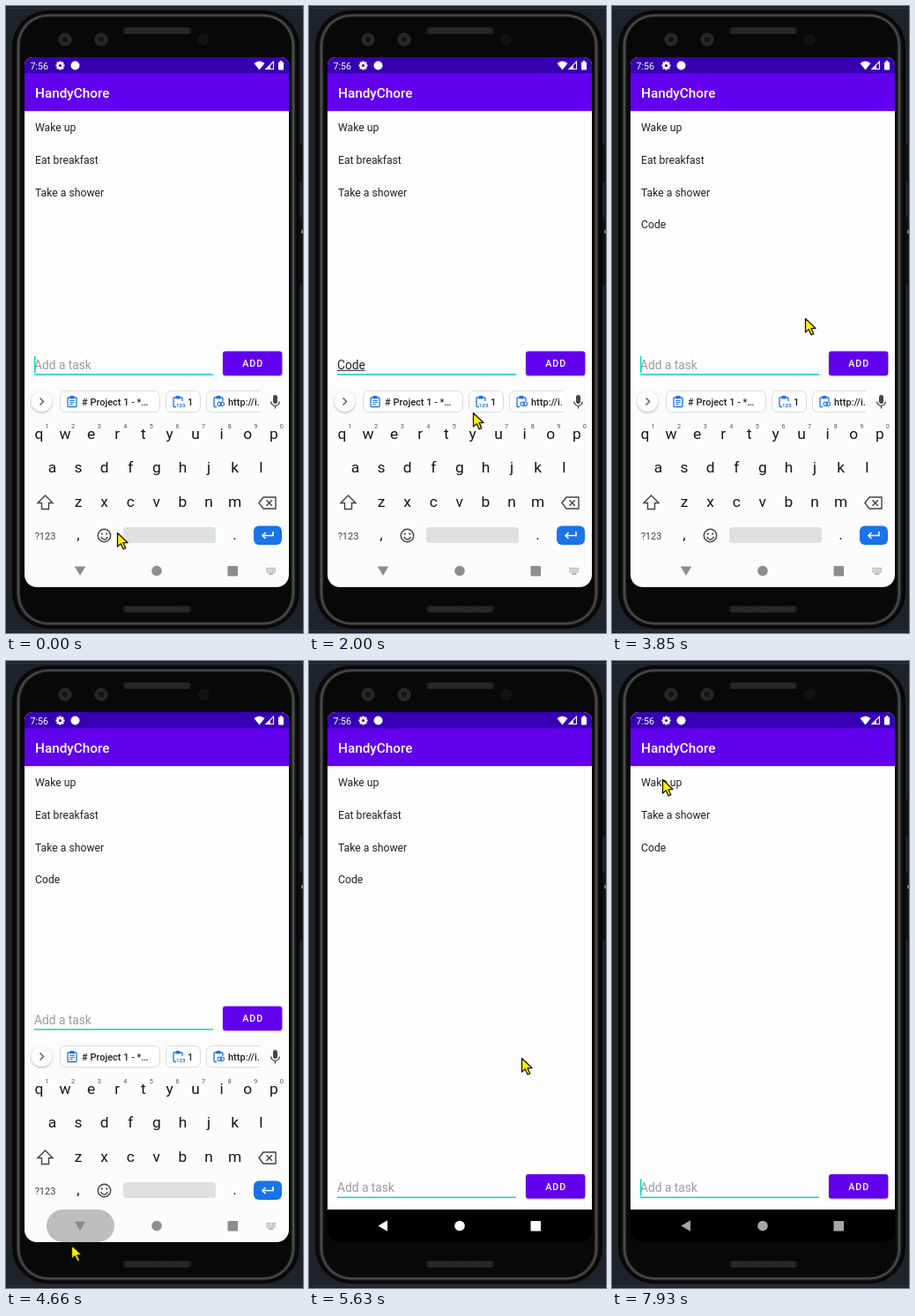
Animation, 337 px wide and 711 px high, one loop 8000 ms. Source, as an HTML page with a canvas:

```html
<!DOCTYPE html>
<html lang="en">
<head>
<meta charset="utf-8">
<title>To-do list demo</title>
<style>
  html, body { margin: 0; width: 100%; height: 100%; overflow: hidden; background: #1f2229; }
  canvas { display: block; width: 337px; height: 711px; }
</style>
</head>
<body>
<canvas id="stage"></canvas>
<script>
const W = 337, H = 711, LOOP = 8000;
const dpr = window.devicePixelRatio || 1;
const stage = document.getElementById('stage');
const keyboard = document.createElement('canvas');
for (const c of [stage, keyboard]) {
  c.width = W * dpr;
  c.height = H * dpr;
  c.getContext('2d').scale(dpr, dpr);
}
let g = keyboard.getContext('2d');

const FIRST_KEY = 440, KEY_GAP = 145, ADDED = 3040;
const HIDING = 4700, HIDDEN = 4900, REMOVED = 6780;
const POINTER_STEP = 140, BLINK = 595;

// Turning points of the pointer: time, x, y.
const PATH = [
  [1400, 126, 597], [1820, 136, 580], [1960, 186, 461], [2240, 268, 372], [2520, 276, 403],
  [3200, 276, 403], [3780, 219, 354], [4200, 102, 372], [4620, 74, 662], [4760, 73, 643],
  [5320, 233, 417], [5600, 241, 450], [6300, 75, 177], [7280, 75, 177], [7840, 57, 134]
];

const clamp = (v, lo = 0, hi = 1) => Math.min(hi, Math.max(lo, v));
const progress = (t, from, to) => clamp((t - from) / (to - from));
const ease = p => p * p * (3 - 2 * p);
const mix = (a, b, p) => a + (b - a) * p;
const gray = v => `rgb(${v}, ${v}, ${v})`;

function box(x, y, w, h, r, fill, stroke, lw = 1) {
  g.beginPath();
  g.roundRect(x, y, w, h, r);
  if (fill) { g.fillStyle = fill; g.fill(); }
  if (stroke) { g.strokeStyle = stroke; g.lineWidth = lw; g.stroke(); }
}
function disc(x, y, r, fill, stroke, lw = 1) {
  box(x - r, y - r, 2 * r, 2 * r, r, fill, stroke, lw);
}
function rect(x, y, w, h, fill) {
  g.fillStyle = fill;
  g.fillRect(x, y, w, h);
}
function poly(points, fill, stroke, lw = 1, closed = true) {
  g.beginPath();
  points.forEach(([x, y]) => g.lineTo(x, y));
  if (closed) g.closePath();
  if (fill) { g.fillStyle = fill; g.fill(); }
  if (stroke) { g.strokeStyle = stroke; g.lineWidth = lw; g.stroke(); }
}
function text(s, x, y, size, color, { weight = 400, space = 0, align = 'left' } = {}) {
  g.font = `${weight} ${size}px Roboto, sans-serif`;
  g.letterSpacing = space + 'px';
  g.textAlign = align;
  g.fillStyle = color;
  g.fillText(s, x, y);
  return g.measureText(s).width;
}
function scoped(draw) {
  g.save();
  draw();
  g.restore();
}
function shadowed(blur, alpha, draw) {
  scoped(() => {
    g.shadowColor = `rgba(0, 0, 0, ${alpha})`;
    g.shadowBlur = blur * dpr;
    g.shadowOffsetY = dpr;
    draw();
  });
}

function drawGrille(y) {
  box(133, y, 77, 8, 4, '#1e1e1e');
  for (let row = 0; row < 3; row++)
    for (let x = 136 + row % 2; x < 207; x += 2) rect(x, y + 1.5 + row * 2, 1, 1, '#424242');
}

function drawPhone() {
  rect(0, 0, W, H, '#1f2229');
  rect(0, 2, W, 1, '#30343c');
  rect(0, 708, W, 1, '#30343c');
  box(331, 157, 5, 43, 2, '#111');
  box(331, 239, 5, 78, 2, '#111');
  rect(335, 254, 2, 4, '#777');
  // The metal rim brightens towards its middle.
  for (let i = 0; i < 12; i++) {
    const shade = 8 + 72 * Math.exp(-(((i - 6.5) / 1.8) ** 2));
    box(7 + i, 5 + i * .8, 326 - 2 * i, 701 - 1.6 * i, 41 - i, gray(shade));
  }
  drawGrille(24);
  drawGrille(680);
  for (const x of [67, 108]) {
    disc(x, 38, 7, '#222224', '#343436');
    disc(x, 38, 4.2, '#151517', '#424244', .8);
  }
  disc(224, 38, 5.5, '#111113', '#1b1b1d');
}

function drawStatusBar() {
  const blue = '#3700b3';
  rect(21, 58, 300, 19, blue);
  text('7:56', 27.5, 71.5, 10.7, '#fff');
  scoped(() => {
    g.translate(61.5, 67.5);
    for (let i = 0; i < 4; i++) {
      g.rotate(Math.PI / 4);
      rect(-1.2, -5, 2.4, 10, '#fff');
    }
    disc(0, 0, 3.8, '#fff');
    disc(0, 0, 1.6, blue);
  });
  disc(78.5, 67.5, 5, '#fff');
  g.beginPath();
  g.moveTo(287.5, 72.5);
  g.lineTo(281.5, 65);
  g.quadraticCurveTo(287.5, 60, 293.5, 65);
  g.fill();
  poly([[295, 71.5], [303.5, 71.5], [303.5, 63]], null, '#fff', 1.1);
  poly([[295, 72], [300, 72], [300, 67]], '#fff');
  box(309, 63.5, 6, 9, 1, '#fff');
  rect(310.7, 62, 2.6, 2, '#fff');
}

function caretOn(t, typedCount) {
  const lastKey = FIRST_KEY + (typedCount - 1) * KEY_GAP;
  const base = t < FIRST_KEY ? 130 - BLINK : t < ADDED ? lastKey : 2652;
  return Math.floor((t - base) / BLINK) % 2 === 0;
}

function drawEntry(t) {
  const count = clamp(Math.floor((t - FIRST_KEY) / KEY_GAP) + 1, 0, 4);
  const typed = t < ADDED ? 'Code'.slice(0, count) : '';
  const teal = '#03dac5';
  let end = 32;
  if (typed) {
    const width = text(typed, 32, 411.7, 13.75, '#212121');
    rect(32, 412.8, width, 1, '#212121');
    end += width;
  } else {
    text('Add a task', 32, 411.7, 13.75, '#9b9b9b');
  }
  rect(32, 417, 203, 1.5, teal);
  if (caretOn(t, count)) rect(end, 397, 1.5, 19, teal);
  shadowed(2, .3, () => box(246, 391.6, 67.3, 27.5, 3, '#6200ee'));
  text('ADD', 280.2, 409.3, 10.7, '#fff', { weight: 500, space: .95, align: 'center' });
}

function drawApp(t) {
  rect(21, 58, 300, 564, '#fdfdfd');
  rect(21, 622, 300, 37, '#000');
  drawStatusBar();
  rect(21, 76.3, 300, 42.9, '#6200ee');
  text('HandyChore', 33, 104, 15.3, '#fff', { weight: 500 });

  const items = ['Wake up', 'Eat breakfast', 'Take a shower'];
  if (t >= ADDED) items.push('Code');
  if (t >= REMOVED) items.splice(1, 1);
  items.forEach((s, i) => text(s, 33, 142.4 + 36.66 * i, 12.2, '#212121'));

  scoped(() => {
    g.translate(0, t < HIDING ? 0 : 190.5);
    drawEntry(t);
  });
}

function drawClipboard(x, kind) {
  const blue = '#1a73e8';
  box(x - 5, 444, 10, 10.5, 1, null, blue, 1.3);
  box(x - 2.5, 442, 5, 3.5, 1, blue);
  if (kind === 'lines') {
    for (let i = 0; i < 3; i++) rect(x - 2.8, 447 + i * 2, i < 2 ? 5.6 : 3.6, 1, blue);
    return;
  }
  rect(x - 2, 448, 9, 8, '#fff');
  if (kind === 'digits') text('123', x - 2, 454.5, 6, blue, { weight: 700 });
  else for (const dx of [-1, 2]) box(x + dx, 449, 4.5, 4.5, 2.2, null, blue, 1.1);
}

function drawChip(x, w, kind, label) {
  box(x + .5, 436.5, w, 24, 6, '#fff', '#d9dbdf');
  drawClipboard(x + 14, kind);
  text(label, x + 25, 453, 11, '#202124', { weight: 500 });
}

function drawSuggestions() {
  const ink = '#44474b';
  shadowed(2.5, .3, () => disc(40.5, 448.5, 11.8, '#fff'));
  poly([[38.5, 444.5], [42.5, 448.5], [38.5, 452.5]], null, '#5f6368', 1.5, false);
  drawChip(61, 113, 'lines', '# Project 1 - *…');
  drawChip(181, 39, 'digits', '1');
  scoped(() => {
    g.beginPath();
    g.rect(226, 434, 62, 30);
    g.clip();
    drawChip(227, 80, 'link', 'http://i.');
  });
  box(303, 441, 5, 10, 2.5, ink);
  g.strokeStyle = ink;
  g.lineWidth = 1.3;
  g.beginPath();
  g.arc(305.5, 448.5, 4.8, 0, Math.PI);
  g.moveTo(305.5, 453);
  g.lineTo(305.5, 456.5);
  g.stroke();
}

function drawKeys() {
  const ink = '#151618', soft = '#3f4246', mid = { align: 'center' };
  const row = (keys, x, y, size = 17.4, color = ink) =>
    [...keys].forEach((k, i) => text(k, x + 29.6 * i, y, size, color, mid));
  row('qwertyuiop', 37.5, 491);
  row('1234567890', 46.5, 478.5, 7.3, '#505458');
  row('asdfghjkl', 52.5, 529);
  row('zxcvbnm', 82, 568);

  poly([[44.5, 555], [53, 563.5], [48.5, 563.5], [48.5, 570.5], [40.5, 570.5],
        [40.5, 563.5], [36, 563.5]], null, soft, 1.4);
  poly([[287, 563.5], [292, 557], [306, 557], [306, 570], [292, 570]], null, soft, 1.4);
  for (const s of [-1, 1])
    poly([[298.7 - 3.2 * s, 560.3], [298.7 + 3.2 * s, 566.7]], null, soft, 1.4, false);

  text('?123', 44.5, 604.5, 11, soft, mid);
  text(',', 82, 605, 17, ink, mid);
  text('.', 259.5, 605, 17, ink, mid);
  for (const dx of [-2.7, 2.7]) disc(111.5 + dx, 598.6, 1.1, soft);
  disc(111.5, 600.5, 7.2, null, soft, 1.4);
  g.beginPath();
  g.arc(111.5, 601.2, 3.8, .2, Math.PI - .2);
  g.stroke();
  box(133, 591, 105, 18, 3.5, '#dfe1e1');
  box(281, 589.5, 32, 21.5, 6, '#1a73e8');
  poly([[303, 596], [303, 600.5], [291, 600.5]], null, '#fff', 1.6, false);
  poly([[294.5, 597], [291, 600.5], [294.5, 604]], null, '#fff', 1.6, false);
}

function drawNav(t) {
  const open = t < HIDING;
  const ripple = t < 4620 ? 0 : .4 * (1 - progress(t, 4780, 5220));
  if (ripple) box(46, 622, 77, 37, 18.5, `rgba(95, 95, 95, ${ripple})`);
  const color = gray(open ? 141 : mix(255, 166, progress(t, 7000, 7500)));
  scoped(() => {
    g.translate(84, 640.5);
    g.rotate(Math.PI / 2 * clamp(Math.ceil((t - HIDING) / 30) / 3.6));
    poly([[-6.3, -5], [6.3, -5], [0, 5.6]], color);
  });
  disc(171, 640.5, 5.8, color);
  box(251.5, 635, 11.5, 11.5, .8, color);
  if (!open) return;
  for (let i = 0; i < 15; i++)
    rect(295.5 + i % 5 * 2.2, 637 + Math.floor(i / 5) * 2.1, 1.4, 1.3, color);
  rect(298, 643.4, 5.5, 1.2, color);
}

function pointerAt(t) {
  const now = Math.floor(t / POINTER_STEP) * POINTER_STEP;
  const next = PATH.findIndex(([k]) => k > now);
  if (next === 0) return PATH[0].slice(1);
  if (next < 0) return PATH.at(-1).slice(1);
  const [t0, x0, y0] = PATH[next - 1], [t1, x1, y1] = PATH[next];
  const p = ease(progress(now, t0, t1));
  return [mix(x0, x1, p), mix(y0, y1, p)];
}

function drawPointer(t) {
  scoped(() => {
    const [x, y] = pointerAt(t);
    g.translate(x + .5, y + .5);
    g.lineJoin = 'round';
    poly([[0, 0], [0, 15.5], [3.7, 12.2], [6.6, 18.4], [9.3, 17.2], [6.5, 11.2], [11.5, 11]],
      '#fff200', '#1c1a00', 1.3);
  });
}

function drawKeyboard(t) {
  if (t >= HIDDEN) return;
  const leaving = t >= HIDING;
  g.globalAlpha = leaving ? .56 : 1;
  g.drawImage(keyboard, 0, leaving ? 20 : 0, W, H);
  g.globalAlpha = 1;
}

function draw(t) {
  drawPhone();
  scoped(() => {
    g.beginPath();
    g.roundRect(21, 58, 300, 601, [9, 9, 14, 14]);
    g.clip();
    drawApp(t);
    drawKeyboard(t);
    drawNav(t);
  });
  drawPointer(t);
}

rect(21, 432, 300, 227, '#fcfcfc');
drawSuggestions();
drawKeys();
g = stage.getContext('2d');

let start = null;
function tick(now) {
  start ??= now;
  draw((now - start) % LOOP);
  requestAnimationFrame(tick);
}
draw(0);
requestAnimationFrame(tick);
</script>
</body>
</html>
```
